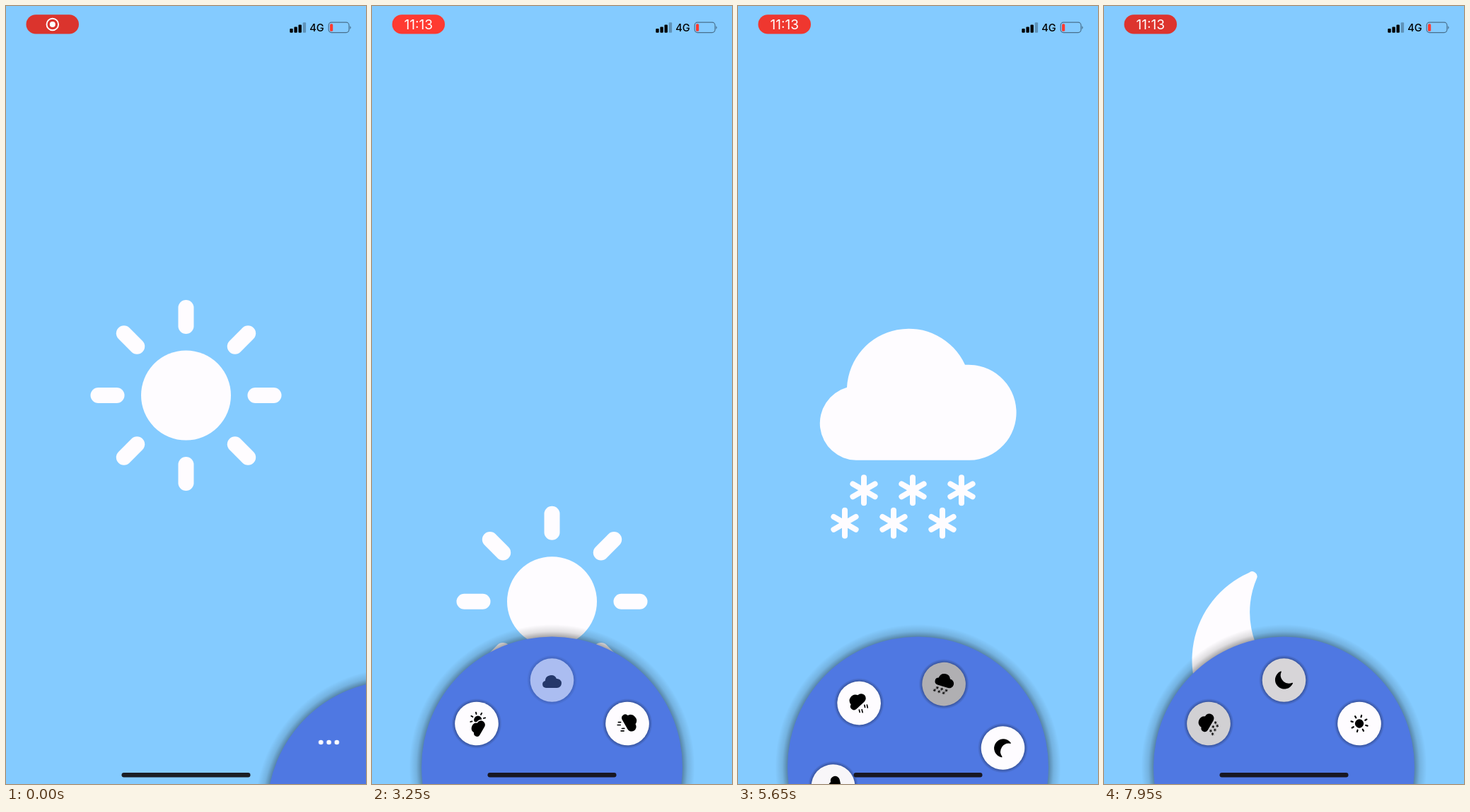
Recreate the animation shown at these times as an HTML page. Size 509x1101 px, loop 8000 ms.

```html
<!DOCTYPE html>
<html lang="en">
<head>
<meta charset="utf-8">
<title>Weather wheel</title>
<style>
  html, body { margin: 0; width: 100%; height: 100%; overflow: hidden; background: #84cbff; }
  svg { display: block; width: 509px; height: 1101px; }
  text { font-family: Inter, Roboto, "Liberation Sans", sans-serif; }
</style>
</head>
<body>
<svg viewBox="0 0 509 1101">
  <defs>
    <radialGradient id="wheelShade">
      <stop offset=".91" stop-color="#000" stop-opacity=".36"/>
      <stop offset=".95" stop-color="#000" stop-opacity=".12"/>
      <stop offset="1" stop-color="#000" stop-opacity="0"/>
    </radialGradient>
    <radialGradient id="buttonShade">
      <stop offset=".86" stop-color="#000" stop-opacity=".3"/>
      <stop offset="1" stop-color="#000" stop-opacity="0"/>
    </radialGradient>

    <path id="cloudShape" d="M-87.5 92.5A52.5 52.5 0 0 1 -100.5 -10.5A87.5 87.5 0 0 1 66.5 -42.5A67.6 67.6 0 1 1 73 92.5Z"/>
    <path id="ray" d="M0 -98V-124" stroke="currentColor" stroke-width="22" stroke-linecap="round"/>
    <path id="flake" d="M0 -18V18M-15.6 -9L15.6 9M-15.6 9L15.6 -9" stroke="currentColor" stroke-width="8" stroke-linecap="round"/>

    <g id="sun" fill="currentColor"><circle r="63.5"/></g>
    <g id="partly" fill="currentColor">
      <g id="partlySun" transform="translate(57 -12) scale(.9)"><circle r="63.5"/></g>
      <use href="#cloudShape" transform="translate(-46 41) scale(.88)" stroke="#fefcff" stroke-width="36"/>
      <use href="#cloudShape" transform="translate(-46 41) scale(.88)"/>
    </g>
    <g id="cloud" fill="currentColor"><use href="#cloudShape" y="21.5"/></g>
    <g id="rain" fill="currentColor">
      <use href="#cloudShape" y="-55.5"/>
      <path d="M-65 74L-82 104M-33 98L-54 134M40 74L23 104M68 98L47 134" stroke="currentColor" stroke-width="17" stroke-linecap="round"/>
    </g>
    <g id="snow" fill="currentColor"><use href="#cloudShape" y="-55.5"/></g>
    <g id="moon" fill="currentColor">
      <path d="M-49.5 -128.5A135 135 0 1 0 128.5 49.5A7 7 0 0 0 120.5 38.5A121 121 0 0 1 -38.5 -120.5A7 7 0 0 0 -49.5 -128.5Z"/>
    </g>
  </defs>

  <rect width="509" height="1101" fill="#84cbff"/>
  <g id="scene" color="#fefcff"></g>

  <g id="wheel">
    <circle r="202" fill="url(#wheelShade)"/>
    <circle r="184.5" fill="#4f78e2"/>
    <g id="buttons"></g>
    <g id="dots" fill="#fefcff">
      <circle cx="-108.5" cy="-97" r="3.3"/>
      <circle cx="-97.2" cy="-97" r="3.3"/>
      <circle cx="-86" cy="-97" r="3.3"/>
    </g>
  </g>

  <rect x="163.5" y="1085" width="182" height="6.4" rx="3.2" fill="#141114" fill-opacity=".93"/>

  <rect id="pill" x="28.5" y="12.3" width="74.5" height="27.2" rx="13.6"/>
  <g id="record" fill="#fff">
    <circle cx="65.8" cy="26" r="8.3" fill="none" stroke="#fff" stroke-width="1.9"/>
    <circle cx="65.8" cy="26" r="4"/>
  </g>
  <text id="clock" x="65.7" y="32.9" font-size="19" fill="#fff" text-anchor="middle">11:13</text>

  <rect x="401.3" y="32" width="4.4" height="5.8" rx="1"/>
  <rect x="407.4" y="29.4" width="4.4" height="8.4" rx="1"/>
  <rect x="413.5" y="26.5" width="4.4" height="11.3" rx="1"/>
  <rect x="419.7" y="23.3" width="4.4" height="14.5" rx="1" opacity=".28"/>
  <text x="439.4" y="36.2" font-size="14.6" font-weight="500" text-anchor="middle">4G</text>
  <g opacity=".45">
    <rect x="456.2" y="23.2" width="28.8" height="14.4" rx="4" fill="none" stroke="#000" stroke-width="1.2"/>
    <path d="M486.3 28.3a2.6 2.6 0 0 1 0 4.6z"/>
  </g>
  <rect x="458" y="25.2" width="4.2" height="10.6" rx="1.6" fill="#ff3b30"/>
</svg>
<script>
const LOOP = 8000, SWAP = 250, DROP = 714;
const NS = "http://www.w3.org/2000/svg";
const $ = id => document.getElementById(id);

function add(parent, tag, attrs) {
  const el = parent.appendChild(document.createElementNS(NS, tag));
  for (const key in attrs) el.setAttribute(key, attrs[key]);
  return el;
}

const clamp = x => Math.min(1, Math.max(0, x));
const mix = (a, b, k) => a + (b - a) * k;
const inOut = x => x < .5 ? 2 * x * x : 1 - 2 * (1 - x) ** 2;
const cubicInOut = x => x < .5 ? 4 * x ** 3 : 1 - 4 * (1 - x) ** 3;
const cubicOut = x => 1 - (1 - x) ** 3;
const ramp = (t, start, length, ease = inOut) => ease(clamp((t - start) / length));
const rgb = (a, b, k) => `rgb(${a.map((v, i) => mix(v, b[i], k))})`;

// Underdamped spring from 0 to 1, time in ms.
function spring(ms) {
  if (ms <= 0) return 0;
  const s = ms / 1000, w = 10.45;
  return 1 - Math.exp(-11 * s) * (Math.cos(w * s) + 11 / w * Math.sin(w * s));
}

// Rays and snowflakes
for (let a = 0; a < 360; a += 45) add($("sun"), "use", { href: "#ray", transform: `rotate(${a})` });
for (const a of [-45, 0, 45, 90, 135]) add($("partlySun"), "use", { href: "#ray", transform: `rotate(${a})` });
for (let i = 0; i < 6; i++) {
  const row = Math.floor(i / 3);
  add($("snow"), "use", { href: "#flake", x: -76.5 + i % 3 * 69 - row * 27, y: 79.5 + row * 46.5 });
}

// Each scene rises at "from" and falls at "to"; "press" is when its button goes down.
const scenes = [
  { name: "sun", from: -1000, to: 3138 },
  { name: "cloud", press: 3030, from: 3388, to: 5200 },
  { name: "snow", press: 4990, from: 5450, to: 7580 },
  { name: "moon", press: 7470, from: 7830, to: 9000 }
];
for (const s of scenes) s.el = add($("scene"), "use", { href: "#" + s.name });

const buttons = ["sun", "partly", "cloud", "rain", "snow", "moon"].map((name, i) => {
  const el = add($("buttons"), "g", { transform: `rotate(${i * 60}) translate(0 -123)` });
  add(el, "circle", { r: 35.5, fill: "url(#buttonShade)" });
  const face = add(el, "circle", { r: 30.8, fill: "#fefcff" });
  add(el, "use", { href: "#" + name, transform: "scale(.0967)", color: "#000" });
  return { el, face, scene: scenes.find(s => s.name === name) };
});

const turns = [
  [1150, 850, cubicInOut],
  [2200, 750, cubicInOut],
  [4300, 650, cubicInOut],
  [5200, 1330, cubicOut],
  [6500, 850, cubicInOut]
];

function draw(t) {
  for (const s of scenes) {
    const y = DROP * (1 - ramp(t, s.from, SWAP) + ramp(t, s.to, SWAP));
    s.el.setAttribute("transform", `translate(254.5 ${551 + y})`);
  }

  const open = spring(t - 485);
  $("wheel").setAttribute("transform", `translate(${mix(553.7, 254.5, open)} ${mix(1139, 1077, open)})`);
  $("dots").setAttribute("opacity", 1 - ramp(t, 400, 150));
  $("buttons").setAttribute("opacity", ramp(t, 500, 220));
  const turned = turns.reduce((sum, turn) => sum + ramp(t, ...turn), 0);
  $("buttons").setAttribute("transform", `rotate(${-60 * turned})`);

  for (const { el, face, scene } of buttons) {
    if (!scene) continue;
    const chosen = ramp(t, scene.from, SWAP) - ramp(t, scene.to + SWAP, SWAP);
    face.setAttribute("fill", rgb([254, 252, 255], [170, 169, 172], chosen));
    if (scene.press) {
      const held = ramp(t, scene.press, 108) - ramp(t, scene.from - SWAP, SWAP);
      el.setAttribute("opacity", 1 - .8 * held);
    }
  }

  const dim = (1 - Math.cos((t - 1220) / 1000 * Math.PI)) / 2;
  $("pill").setAttribute("fill", rgb([255, 58, 49], [214, 51, 45], dim));
  const timed = t >= 2650;
  $("record").setAttribute("visibility", timed ? "hidden" : "visible");
  $("clock").setAttribute("visibility", timed ? "visible" : "hidden");
}

const begin = performance.now();
function tick() {
  draw((performance.now() - begin) % LOOP);
  requestAnimationFrame(tick);
}
draw(0);
requestAnimationFrame(tick);
</script>
</body>
</html>
```
